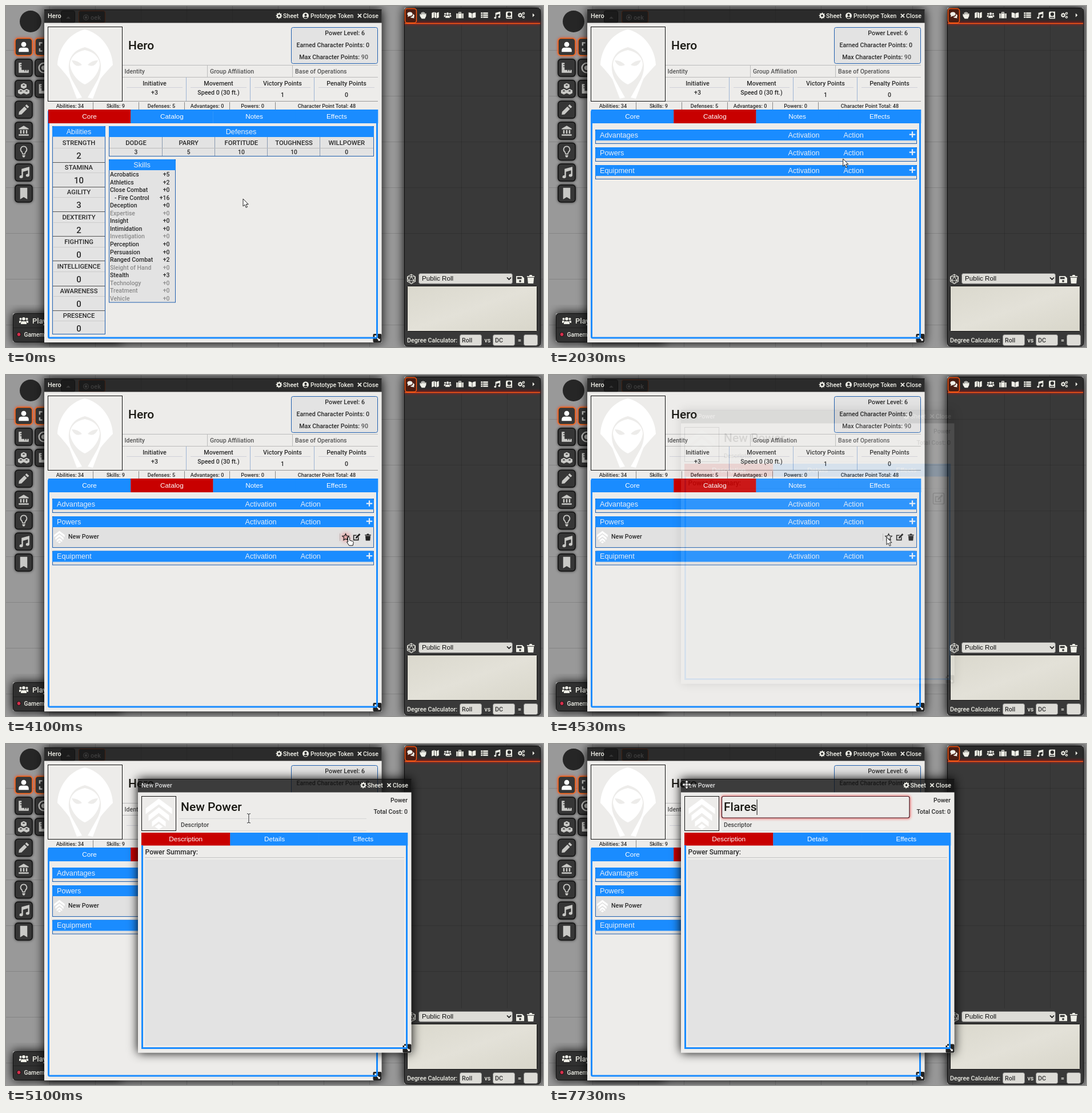
Write an HTML page that moves like this. It is 940x596 px and loops after 8 s.

```html
<!DOCTYPE html>
<html lang="en">
<head>
<meta charset="utf-8">
<title>Character sheet</title>
<style>
html, body { margin: 0; width: 100%; height: 100%; overflow: hidden; background: #999; }
svg { display: block; width: 940px; height: 596px; }
text { font-family: Roboto, "Open Sans", sans-serif; font-weight: 500; white-space: pre; }
.plain { font-family: "Liberation Sans", Arial, sans-serif; font-weight: 400; }
.hot { filter: drop-shadow(0 0 4px #f00); }
</style>
</head>
<body>
<svg id="stage" viewBox="0 0 940 596"></svg>
<script>
const BLUE = '#1a8cff', RED = '#c80000', EDGE = '#1f5fae', PAPER = '#edecea', PANEL = '#e3e3e3', PALE = '#f0f0e8', INK = '#2a2a2a';

const icons = {
  user: 'M8 1a3.5 3.5 0 0 1 0 7a3.5 3.5 0 0 1 0-7M1 15v-2q0-4 4-4h6q4 0 4 4v2z',
  ruler: 'M1 1h4v2H3v1h2v2H3v1h2v4h4v2h1v-2h2v2h1v-2h2v4H1z',
  cubes: 'M8 0l4 2v4L8 8 4 6V2zM8 2L6 3l2 1 2-1zM4 8l4 2v4l-4 2-4-2v-4zM4 10l-2 1 2 1 2-1zM12 8l4 2v4l-4 2-4-2v-4zM12 10l-2 1 2 1 2-1z',
  pencil: 'M9 3.5L12.5 7 5 14.5 1 15l.5-4zM10 2.5l2-2 3.5 3.5-2 2z',
  bank: 'M8 1l7 4v1H1V5zM3 7h2v5H3zM7 7h2v5H7zM11 7h2v5h-2zM1 13h14v2H1z',
  bulb: 'M8 0a5 5 0 0 1 3 9l-1 3H6L5 9a5 5 0 0 1 3-9zM8 1.5a3.5 3.5 0 0 0-2 6.4l1 2.6h2l1-2.6a3.5 3.5 0 0 0-2-6.4zM6 13h4v1l-1 2H7l-1-2z',
  music: 'M5 3l11-3v12a2.5 2 0 1 1-2-2V5L7 7v7a2.5 2 0 1 1-2-2z',
  bookmark: 'M3 0h10v16l-5-3-5 3z',
  chat: 'M6 1c8 0 8 9 0 9l-5 2 1-3C-2 5 1 1 6 1zM13 5c4 2 4 6 2 7l1 3-5-1c-2 0-3-1-4-2 4 0 7-3 6-7z',
  fist: 'M4 2h2v4h1V1h2v5h1V2h2v4h1V4h2v6l-3 6H5l-4-6V5h2v2h1z',
  map: 'M0 3l5-2v12l-5 2zM6 1l4 2v12l-4-2zM11 3l5-2v12l-5 2z',
  users: 'M8 2a2.8 2.8 0 0 1 0 5.6a2.8 2.8 0 0 1 0-5.6M3 14v-2q0-3 3-3h4q3 0 3 3v2zM2.5 3a2 2 0 0 1 0 4a2 2 0 0 1 0-4M13.5 3a2 2 0 0 1 0 4a2 2 0 0 1 0-4M0 12V8h4l-2 4zM16 12V8h-4l2 4z',
  suitcase: 'M5 4V1h6v3h1v11H4V4zM6.5 2.5V4h3V2.5zM0 4h3v11H0zM13 4h3v11h-3z',
  book: 'M0 2q5 0 7.5 2v11Q5 13 0 13zM16 2q-5 0-7.5 2v11q3-2 7.5-2z',
  list: [2, 6.5, 11].map(y => `M0 ${y}h4v3H0zM5 ${y}h11v3H5z`).join(''),
  atlas: 'M3 0h12v16H3q-2-1-2-3V3q0-2 2-3zM8.5 2a4 4 0 0 0 0 8a4 4 0 0 0 0-8zM3 12h10v2H3z',
  caret: 'M5 2l6 6-6 6z',
  up: 'M2 11l6-6 6 6z',
  save: 'M0 1h12l4 4v10H0zM2 3v4h9V3zM8 9a2.2 2.2 0 0 0 0 4.4a2.2 2.2 0 0 0 0-4.4z',
  trash: 'M1 2h4l1-2h4l1 2h4v2H1zM2 5h12l-1 11H3z',
  edit: 'M1 3h8L7 5H3v8h8V9l2-2v8H1zM14 0l2.5 2.5L9 10l-3 1 .5-3.5z',
  profile: 'M8 0a8 8 0 0 1 0 16a8 8 0 0 1 0-16M8 3a3 3 0 0 0 0 6a3 3 0 0 0 0-6M3 13q5 3 10 0q-1-3-5-3t-5 3',
  close: 'M2 4l2-2 4 4 4-4 2 2-4 4 4 4-2 2-4-4-4 4-2-2 4-4z',
  plus: 'M6.5 1h3v5.5H15v3H9.5V15h-3V9.5H1v-3h5.5z',
  expand: 'M1 1h5v2H3v3H1zM10 1h5v5h-2V3h-3zM1 10h2v3h3v2H1zM13 10h2v5h-5v-2h3z',
  target: 'M8 0a8 8 0 0 1 0 16a8 8 0 0 1 0-16M8 2a6 6 0 0 0 0 12a6 6 0 0 0 0-12M8 4.5a3.5 3.5 0 0 1 0 7a3.5 3.5 0 0 1 0-7',
  resize: 'M1 1h6L5 3l8 8 2-2v6H9l2-2-8-8-2 2z',
  cog: gear(8, 8, 8),
  cogs: gear(5.5, 8, 5.5) + gear(13, 4, 3.2) + gear(13, 12.5, 3.2)
};

function gear(cx, cy, r) {
  const teeth = Array.from({ length: 32 }, (_, i) => {
    const a = i * Math.PI / 16, d = i % 4 < 2 ? r : r * .75;
    return `${(cx + d * Math.cos(a)).toFixed(2)} ${(cy + d * Math.sin(a)).toFixed(2)}`;
  });
  const h = r * .35;
  return `M${teeth.join('L')}zM${cx} ${cy - h}a${h} ${h} 0 0 0 0 ${2 * h}a${h} ${h} 0 0 0 0 ${-2 * h}`;
}

const rect = (x, y, w, h, fill, extra = '') => `<rect x="${x}" y="${y}" width="${w}" height="${h}" fill="${fill}" ${extra}/>`;
const box = (x, y, w, h, fill, stroke, r = 0, width = 1, extra = '') =>
  rect(x, y, w, h, fill, `stroke="${stroke}" stroke-width="${width}" rx="${r}" ${extra}`);
const path = (d, fill, extra = '') => `<path d="${d}" fill="${fill}" ${extra}/>`;
const line = (d, stroke = '#bbb', width = 1) => path(d, 'none', `stroke="${stroke}" stroke-width="${width}"`);
const txt = (s, x, y, size = 10.7, fill = INK, anchor = 'start', extra = '') =>
  `<text x="${x}" y="${y}" font-size="${size}" fill="${fill}" text-anchor="${anchor}" ${extra}>${s}</text>`;
const mid = (s, x, y, size, fill) => txt(s, x, y, size, fill, 'middle');
const plain = (s, x, y, size = 12.7, fill = '#e6eef8', anchor = 'start') => txt(s, x, y, size, fill, anchor, 'class="plain"');
const icon = (name, cx, cy, size = 13, fill = PALE) =>
  path(icons[name], fill, `fill-rule="evenodd" transform="translate(${cx - size / 2} ${cy - size / 2}) scale(${size / 16})"`);
const group = (id, content) => `<g id="${id}">${content}</g>`;
const bar = (x, y, w, h) => path(`M${x} ${y + h}v${4 - h}q0-4 4-4h${w - 8}q4 0 4 4v${h - 4}z`, BLUE);

let clips = 0;
function shadow(x, y, w, h) {
  const id = 'outside' + clips++;
  return `<clipPath id="${id}"><path clip-rule="evenodd" d="M-50-50H990V650H-50ZM${x} ${y}h${w}v${h}h${-w}z"/></clipPath>
    <g clip-path="url(#${id})">${rect(x, y, w, h, '#000', 'filter="url(#blur)"')}</g>`;
}

function frame(x, y, w, h) {
  return shadow(x, y, w, h) + rect(x, y, w, 24, '#111', 'opacity=".8"') +
    rect(x, y + 23.5, w, h - 23.5, PAPER) + line(`M${x} ${y + .5}h${w}`, '#111') +
    rect(x + w - 15, y + h - 15, 15, 15, '#222', 'rx="2"') + icon('resize', x + w - 7.5, y + h - 7.5, 11, '#fff');
}

function tabs(names, x, y, w, h, active, prefix) {
  const step = w / names.length;
  return names.map((name, i) => rect(x + i * step, y, step + .3, h, i === active ? RED : BLUE) +
    group(prefix + name, plain(name, x + (i + .5) * step, y + h / 2 + 4, 11.8, '#fff', 'middle'))).join('');
}

function backdrop() {
  let s = '';
  for (let y = 77; y < 596; y += 80) s += line(`M0 ${y + .5}H940`, '#0002');
  for (let x = 77; x < 940; x += 80) s += line(`M${x - .5} 0V596`, '#0002');
  s += '<circle cx="43" cy="27" r="19" fill="#262626"/>';
  s += box(96.5, 8.5, 24, 21, '#444', '#111', 3) + icon('up', 109, 20, 10, '#ccc');
  s += box(127.5, 8.5, 46, 21, '#444', '#ff5a14', 3) + icon('target', 140, 20, 10, '#ddd') + txt('oek', 148, 24, 11, '#eee');
  ['user', 'ruler', 'cubes', 'pencil', 'bank', 'bulb', 'music', 'bookmark'].forEach((name, i) => {
    const y = 71.5 + i * 36.6, side = ['expand', 'target', 'ruler'][i];
    const button = (x, on) => rect(x, y - 15, 30, 30, on ? '#ff3000' : '#000', 'rx="5" filter="url(#soft)"') +
      box(x, y - 15, 30, 30, '#363636', on ? '#ff6a1a' : '#111', 5, 1.5);
    s += button(16, i === 0) + icon(name, 31, y, 20, i ? '#c9c9c6' : '#fff');
    if (side) s += button(51, i === 0) + icon(side, 66, y, 19, '#c9c9c6');
  });
  return s + shadow(12, 537, 190, 50) + box(12.5, 537.5, 190, 50, '#303030', '#111', 5) + line('M13 562.5H200', '#222') +
    icon('users', 31, 550, 16) + txt('Players', 46, 554.5, 13, PALE) +
    '<circle cx="22.5" cy="574" r="3.5" fill="#d5304c" stroke="#111"/>' + txt('Gamemaster', 31.5, 578, 10.3, PALE);
}

function sidebar() {
  let s = shadow(697, 3, 238, 591) + box(697.5, 3.5, 238, 591, '#393939', '#0c0c0c', 5) + rect(698, 4, 237, 26, '#2b2b2b', 'rx="4"');
  for (let y = 77; y < 450; y += 80) s += line(`M698 ${y + .5}H935`, '#0002');
  s += line('M797.5 32V462M877.5 32V462', '#0002');
  s += rect(698, 29, 237, 2, '#f00', 'filter="url(#soft)"') + line('M698 30.5H935', '#ff5a14', 1.5);
  s += box(698.5, 4.5, 20, 25, '#4a1d12', '#ff5a14', 4, 1.5);
  ['chat', 'fist', 'map', 'users', 'suitcase', 'book', 'list', 'music', 'atlas', 'cogs', 'caret'].forEach((name, i) =>
    s += icon(name, 708.5 + i * 21.5, 16, i === 10 ? 9 : 12.5));
  s += line('M709.5 469l7 4v8.5l-7 4-7-4V473zv4l-4.5 7h9l-4.5-7M702.5 473h14M702.5 481.5l2.5-1.5 4.5 5.5 4.5-5.5 2.5 1.5M702.5 473l2.5 7M716.5 473l-2.5 7', PALE);
  s += box(722.5, 467.5, 164, 18, '#dddcd7', '#777', 3) + plain('Public Roll', 728, 480, 11.7, '#111') + line('M877 474.5l3.5 3.5 3.5-3.5', '#111', 1.7);
  s += icon('save', 900, 478, 14) + icon('trash', 918.5, 477.5, 15);
  s += box(702.5, 489.5, 227, 79, 'url(#parchment)', '#111', 1);
  s += txt('Degree Calculator:', 702, 587.5, 10.7, PALE) + txt('vs', 837.5, 587.5, 10.7, PALE) + txt('=', 896, 587.5, 10.7, PALE);
  [[794, 39, 'Roll'], [852, 39, 'DC'], [906, 25, '']].forEach(([x, w, label]) =>
    s += box(x + .5, 574.5, w - 1, 19, '#dddcd7', '#888', 3) + txt(label, x + 4, 587.5, 10.7, '#333'));
  return s;
}

function portrait() {
  const eye = path('M115 95q11 0 18 8q-12 6-18-8', PAPER);
  return box(73.5, 36.5, 130, 130, PAPER, '#111') +
    path('M138 41C111 47 91 74 90 103 97 110 107 122 111 128L124 162 133 160 115 128C106 110 106 80 138 72 170 80 170 110 161 128L143 160 152 162 165 128C169 122 180 110 187 103 186 74 165 47 138 41z', '#fff') +
    path('M138 77C122 80 112 90 112 103 114 118 126 132 138 137 150 132 162 118 164 103 164 90 154 80 138 77z', '#fff') +
    eye + `<g transform="matrix(-1 0 0 1 276 0)">${eye}</g>`;
}

function heroHead() {
  let s = frame(67, 6, 590.5, 582) + txt('Hero', 73, 21, 11, PALE);
  s += icon('cog', 478, 17, 11) + txt('Sheet', 485, 21, 10.7, PALE) + icon('profile', 524.5, 17, 11) +
    txt('Prototype Token', 533, 21, 10.4, PALE) + icon('close', 619, 17, 10) + txt('Close', 625, 21, 10.6, PALE);
  s += portrait() + txt('Hero', 214, 76, 21, '#191813');
  s += box(499.5, 37.5, 151, 63, PANEL, EDGE, 3) + txt('Power Level: 6', 628, 51, 10.7, INK, 'end') +
    txt('Earned Character Points: 0', 636, 72, 10.7, INK, 'end') +
    txt('Max Character Points: <tspan fill="#555">90</tspan>', 634, 92.5, 10.7, INK, 'end');
  s += line('M204 103.5H651M204 124.5H651M352.5 104V124M501.5 104V124') + line('M204 166.5H651', '#999');
  [['Identity', 207.5], ['Group Affiliation', 357], ['Base of Operations', 506]].forEach(([label, x]) => s += txt(label, x, 117.5, 10.6, '#555'));
  [['Initiative', '+3', 155], ['Movement', 'Speed 0 (30 ft.)', 155], ['Victory Points', 1, 159], ['Penalty Points', 0, 159]].forEach(([label, value, y], i) => {
    const x = 260 + i * 112;
    s += mid(label, x, 139, 10.8) + mid(value, x, y, 10.6) + line(`M${x - 49} 142.5h98`, '#d0d0d8');
    if (i) s += line(`M${x - 56.5} 125v41`, '#9db4d4');
  });
  [['Abilities: 34', 112], ['Skills: 9', 192], ['Defenses: 5', 272], ['Advantages: 0', 352], ['Powers: 0', 431.5], ['Character Point Total: 48', 561.5]]
    .forEach(([label, x]) => s += mid(label, x, 178, 9.2));
  s += line('M152.5 168v13M232.5 168v13M312.5 168v13M391.5 168v13M471.5 168v13', '#888');
  return s + box(74.5, 183, 575, 397, 'none', BLUE, 2, 3);
}

function corePanel() {
  let s = box(81.5, 210.5, 92, 363, PANEL, EDGE) + bar(81, 210, 93, 18.5) + plain('Abilities', 127.5, 224, 12.7, '#e6eef8', 'middle');
  const scores = { STRENGTH: 2, STAMINA: 10, AGILITY: 3, DEXTERITY: 2, FIGHTING: 0, INTELLIGENCE: 0, AWARENESS: 0, PRESENCE: 0 };
  Object.entries(scores).forEach(([name, score], i) => {
    const y = 243 + i * 43.2;
    s += mid(name, 127.5, y, 11.3) + mid(score, 127.5, y + 24, 15) + line(`M83 ${Math.round(y + 5) + .5}H173`, '#ccc');
    if (i < 7) s += line(`M82 ${Math.round(y + 29.5) + .5}H173`, '#555');
  });
  s += box(180.5, 210.5, 463, 52, PANEL, EDGE) + bar(180, 210, 464, 19) + plain('Defenses', 411.5, 224, 12.7, '#e6eef8', 'middle');
  Object.entries({ DODGE: 3, PARRY: 5, FORTITUDE: 10, TOUGHNESS: 10, WILLPOWER: 0 }).forEach(([name, value], i) => {
    const x = 227.5 + i * 92.2;
    s += mid(name, x, 243, 11.3) + mid(value, x, 259, 10.3);
    if (i) s += line(`M${Math.round(x - 46) - .5} 229v33`, '#8899b0');
  });
  s += line('M181 248.5H643');
  s += box(180.5, 268.5, 116, 249.5, PANEL, EDGE) + bar(180, 268, 117, 19) + plain('Skills', 238, 282, 12.7, '#e6eef8', 'middle');
  const skills = 'Acrobatics 5,Athletics 2,Close Combat 0,  - Fire Control 16,Deception 0,*Expertise 0,Insight 0,Intimidation 0,*Investigation 0,Perception 0,Persuasion 0,Ranged Combat 2,*Sleight of Hand 0,Stealth 3,*Technology 0,*Treatment 0,*Vehicle 0';
  skills.split(',').forEach((entry, i) => {
    const [, muted, name, bonus] = entry.match(/^(\*?)(.*) (\d+)$/), y = 298 + i * 13.56, color = muted ? '#8b8b8b' : INK;
    s += txt(name.trim(), name[0] === ' ' ? 190 : 182, y, 10.5, color) + txt('+' + bonus, 286.5, y, 10.5, color, 'end');
  });
  return s;
}

const chevrons = path('M30 4L53 21V31L30 14 7 31V21zM30 19L48 33V43L30 29 12 43V33zM30 35L42 44V53L30 44 18 53V44zM30 48l7 5-7 5-7-5z', '#fff');

function section(name, y, h, plusId = 'plus' + name) {
  return box(81.5, y + .5, 562, h, '#e1e1e1', EDGE) + bar(81, y, 563, 19) + plain(name, 89, y + 13.5) +
    plain('Activation', 418.5, y + 13.5) + plain('Action', 515.5, y + 13.5) + group(plusId, icon('plus', 636, y + 8.5, 12, '#e6eef8'));
}

function catalogPanel() {
  const star = Array.from({ length: 10 }, (_, i) => {
    const a = i * Math.PI / 5, r = i % 2 ? 2.9 : 6;
    return `${(594.5 + r * Math.sin(a)).toFixed(1)} ${(283.5 - r * Math.cos(a)).toFixed(1)}`;
  }).join('L');
  const item = `<g transform="translate(81.5 271) scale(.4)">${chevrons}</g>` + txt('New Power', 109, 286, 10.6) +
    line('M584.5 277v13') + group('star', line(`M${star}z`, '#222', 1.3)) +
    group('edit', icon('edit', 613.5, 283.5, 13, '#222')) + group('trash', icon('trash', 633.5, 283.5, 12, '#222'));
  return section('Advantages', 216, 24) + group('powers', section('Powers', 247, 24)) +
    group('item', section('Powers', 247, 54, 'plusFilled') + item) + group('equipment', section('Equipment', 278, 24));
}

function powerWindow() {
  return frame(231, 61, 478.5, 478.5) + txt('New Power', 237, 76, 10.6, '#ddd') +
    icon('cog', 625.5, 72, 11) + txt('Sheet', 632.5, 76, 10.7, PALE) + icon('close', 670.5, 72, 10) + txt('Close', 677, 76, 10.6, PALE) +
    box(237.5, 91.5, 60, 60, PAPER, '#111') + `<g transform="translate(237.5 91.5)">${chevrons}</g>` +
    line('M303 130.5H631M303 151.5H631', '#d6d6d6') +
    group('focus', box(303, 92, 328, 37, 'none', '#f00', 3, 2, 'filter="url(#soft)"') + box(302.5, 91.5, 328.5, 37.5, PAPER, '#42101a', 3, 1.2)) +
    txt('', 306, 117, 21, '#191813', 'start', 'id="field"') +
    `<clipPath id="picked"><rect id="pickedBox" y="96" height="28"/></clipPath>
     <g clip-path="url(#picked)">${rect(300, 96, 120, 28, '#7d7d7d')}${txt('New Power', 306, 117, 21, '#f0f0f0')}</g>` +
    rect(0, 97, 1, 27, '#111', 'id="caret"') +
    txt('Descriptor', 306, 145, 10.6, '#444') + txt('Power', 703, 102, 10.6, INK, 'end') + txt('Total Cost: 0', 703, 122, 10.6, INK, 'end') +
    tabs(['Description', 'Details', 'Effects'], 237, 155, 466, 22.5, 0, 'power') +
    line('M238.5 177V531.5H701.5V177', BLUE, 3) + txt('Power Summary:', 243.5, 193, 12.1) + line('M243 198.5H697', '#c4c4c4') +
    rect(243, 202, 454, 325, PANEL) +
    group('editor', box(672.5, 206.5, 19, 19, PANEL, '#222', 2, 1.5) + icon('edit', 682, 216, 14, '#222'));
}

const beam = 'M-3-8h2l1 1 1-1h2M0-7V7M-3 8h2l1-1 1 1h2';
const cursors = {
  arrow: path('M0 0v13l3-2.7 2.2 5 2.2-1-2.2-4.8h4z', '#fff', 'stroke="#222"'),
  hand: path('M-1.5 1q1.5-2 3 0v5l5 1.5q2 .5 1.5 3l-1 4.5H.5l-4-6q0-2 2 0z', '#fff', 'stroke="#111"'),
  beam: line(beam, '#fff', 3) + line(beam, '#111'),
  move: path('M0-8l3.5 4H1.2v2.800H4v-2.300L8 0 4 3.500V1.200H1.200V4h2.300L0 8-3.500 4h2.300V1.200H-4v2.300L-8 0l4-3.500v2.300h2.800V-4h-2.300z', '#fff', 'stroke="#111"')
};

const stage = document.getElementById('stage');
stage.innerHTML = `<defs>
  <filter id="blur" x="-30%" y="-30%" width="160%" height="160%"><feGaussianBlur stdDeviation="9"/></filter>
  <filter id="soft" x="-30%" y="-300%" width="160%" height="700%"><feGaussianBlur stdDeviation="2.5"/></filter>
  <linearGradient id="parchment" x2="1" y2="1"><stop stop-color="#dad8cd"/><stop offset=".5" stop-color="#e3e1d8"/><stop offset="1" stop-color="#d8d6ca"/></linearGradient>
  </defs>` + rect(0, 0, 940, 596, '#999') + backdrop() + sidebar() + heroHead() +
  ['Core', 'Catalog'].map((name, i) => group('page' + name,
    tabs(['Core', 'Catalog', 'Notes', 'Effects'], 74, 181, 577, 24, i, name) + (i ? catalogPanel() : corePanel()))).join('') +
  group('power', powerWindow()) +
  group('pointer', Object.entries(cursors).map(([name, shape]) => group(name, shape)).join(''));

const $ = id => document.getElementById(id);
const show = (id, on) => $(id).style.display = on ? '' : 'none';
const clamp = v => Math.min(1, Math.max(0, v));

// time, x, y of the pointer
const route = [
  [230, 415, 337], [370, 428, 245], [450, 432, 196], [570, 300, 191], [1700, 300, 191], [1800, 250, 196],
  [1870, 330, 225], [2030, 514, 267], [2150, 600, 279], [2330, 648, 261], [2630, 648, 261], [2700, 634, 260],
  [3030, 634, 260], [3400, 628, 279], [3830, 593, 284], [3900, 595, 284], [4100, 600, 283], [4230, 613, 284],
  [4500, 613, 284], [4630, 520.5, 282], [4850, 440, 215], [5100, 425, 130], [5300, 414, 110], [5400, 412, 110],
  [5600, 305, 103], [5730, 265, 77], [5869, 265, 77], [5870, 241, 71]
];
const hotspots = [
  [['CoreCatalog', 'CatalogCatalog'], 290, 193, 72, 12], [['CoreNotes', 'CatalogNotes'], 434, 193, 72, 12],
  [['plusPowers', 'plusFilled'], 636, 256, 8, 9], [['star'], 594, 283, 9.5, 9], [['edit'], 613, 283, 9.5, 9], [['trash'], 633, 283, 9, 9]
];

function pointerAt(t) {
  const next = route.findIndex(p => p[0] > t);
  if (next === 0) return route[0].slice(1);
  if (next < 0) return route[route.length - 1].slice(1);
  const [t0, x0, y0] = route[next - 1], [t1, x1, y1] = route[next], k = (t - t0) / (t1 - t0);
  return [x0 + (x1 - x0) * k, y0 + (y1 - y0) * k];
}

function draw(t) {
  const [x, y] = pointerAt(t), opened = t >= 4500, typed = Math.floor((t - 7300) / 86) + 1;
  show('pageCore', t < 1530);
  show('pageCatalog', t >= 1530);
  show('powers', t < 3030);
  show('item', t >= 3030);
  $('equipment').setAttribute('transform', `translate(0 ${t >= 3030 ? 29.5 : 0})`);

  let hovering = false;
  for (const [ids, cx, cy, w, h] of hotspots) {
    const on = !opened && Math.abs(x - cx) < w && Math.abs(y - cy) < h;
    hovering = hovering || on;
    ids.forEach(id => $(id).classList.toggle('hot', on));
  }

  show('power', opened);
  $('power').setAttribute('opacity', .5 - Math.cos(Math.PI * clamp((t - 4490) / 200)) / 2);
  show('editor', y > 202 && x < 697);
  show('focus', t >= 5400);
  $('field').textContent = typed > 0 ? 'Flares'.slice(0, typed) : 'New Power';
  const left = t >= 5400 && typed <= 0 ? Math.max(305.5, x) : 412;
  $('pickedBox').setAttribute('x', left);
  $('pickedBox').setAttribute('width', 412 - left);
  show('caret', typed > 0);
  if (opened) $('caret').setAttribute('x', 306 + $('field').getComputedTextLength());

  const inField = opened && x > 302 && x < 631 && y > 91 && y < 130;
  const shape = t >= 5700 ? 'move' : inField ? 'beam' : hovering ? 'hand' : 'arrow';
  Object.keys(cursors).forEach(name => show(name, name === shape));
  $('pointer').setAttribute('transform', `translate(${x} ${y})`);
}

function tick() {
  draw(performance.now() % 8000);
  requestAnimationFrame(tick);
}
tick();
</script>
</body>
</html>
```
